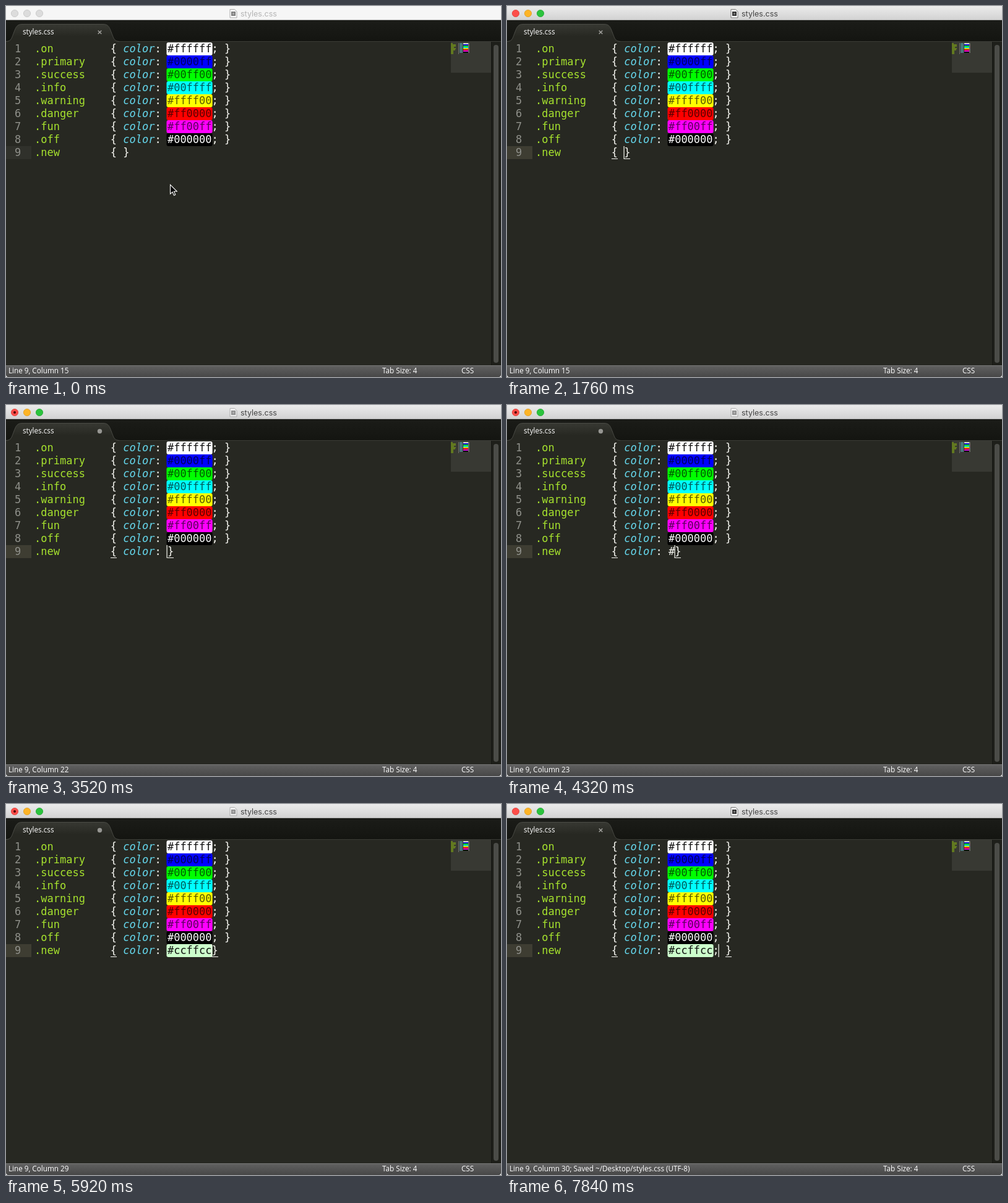
These frames come from a looping animation (800x601 px, 8000 ms). An HTML page:

```html
<!DOCTYPE html>
<html lang="en">
<head>
<meta charset="utf-8">
<title>styles.css</title>
<style>
  html, body { margin: 0; width: 100%; height: 100%; overflow: hidden; background: #272822; }
  svg { display: block; width: 800px; height: 601px; }
  text { white-space: pre; }
  .code text { font: 17px "DejaVu Sans Mono", monospace; fill: #f8f8f2; }
  .code .num { fill: #8f908a; }
  .code .sel { fill: #a6e22e; }
  .code .prop { fill: #66d9ef; font-style: italic; }
  .code .hex { fill: #ae81ff; }
  .code .dark { fill: #000; fill-opacity: .65; }
  .code .black { fill: #111; }
  .code .white { fill: #fff; }
  .ui { font: 11.7px "Open Sans", sans-serif; fill: #fff; }
  .title { font: 12.5px Inter, sans-serif; }
</style>
</head>
<body>
<svg viewBox="0 0 800 601">
  <defs>
    <linearGradient id="bar" x2="0" y2="1"><stop stop-color="#ebebeb"/><stop offset="1" stop-color="#d2d2d2"/></linearGradient>
    <linearGradient id="strip" x2="0" y2="1"><stop stop-color="#1b1c18"/><stop offset="1" stop-color="#141511"/></linearGradient>
    <linearGradient id="tab" x2="0" y2="1"><stop stop-color="#373832"/><stop offset=".7" stop-color="#272822"/></linearGradient>
    <linearGradient id="status" x2="0" y2="1"><stop stop-color="#626262"/><stop offset="1" stop-color="#474747"/></linearGradient>
  </defs>
  <rect width="800" height="601" fill="#272822"/>

  <rect y="23" width="800" height="34" fill="url(#strip)"/>
  <path d="M0 57.5H800" stroke="#3b3c36"/>
  <path d="M0 58C9 57 9 52 13 42C16 34 18 29.500 26 29.500H157C165 29.500 167 34 170 42C174 52 174 57 183 58Z" fill="url(#tab)"/>
  <path d="M0 57.500C9 57 9 52 13 42C16 34 18 29.500 26 29.500H157C165 29.500 167 34 170 42C174 52 174 57 183 57.500" fill="none" stroke="#4a4b45"/>
  <text class="ui" x="27" y="46">styles.css</text>
  <path id="close" d="M148.700 39.700l5.600 5.600m0-5.600l-5.600 5.600" stroke="#a5a5a1" stroke-width="1.400"/>
  <circle id="dirty" cx="151.500" cy="42.500" r="3.700" fill="#969692"/>

  <rect id="titlebar" width="800" height="23"/>
  <path d="M0 22.500H800" stroke="#b3b3b3"/>
  <g id="lights" stroke-width=".8"></g>
  <circle id="unsaved" cx="14" cy="12" r="2" fill="#4d0000"/>
  <g id="icon">
    <path d="M362 5.500h7.500l3.500 3.500v10h-11z" fill="#fff" stroke="#777"/>
    <rect x="364" y="9" width="7" height="7" fill="#333"/>
    <rect x="366" y="11" width="3" height="3" fill="#777"/>
  </g>
  <text id="title" class="title" x="379" y="17">styles.css</text>

  <rect x="719" y="58" width="65" height="50" fill="#383933"/>
  <g id="map"></g>
  <rect x="784" y="58" width="16" height="524" fill="#1e1f1a"/>
  <path d="M784.500 58V582" stroke="#151612"/>
  <rect x="788" y="63" width="8" height="515" rx="4" fill="#4b4c48"/>

  <rect id="gutter" y="227" width="41" height="21"/>
  <g id="rows" class="code"></g>
  <g id="live" class="code"></g>

  <rect y="582" width="800" height="19" fill="url(#status)"/>
  <path d="M0 582.500H800" stroke="#767676"/>
  <path d="M0 597v4h3q-3-1-3-4M800 597v4h-3q3-1 3-4" fill="#fff"/>
  <text id="info" class="ui" x="4" y="595"></text>
  <text class="ui" x="608" y="595">Tab Size: 4</text>
  <text class="ui" x="736" y="595">CSS</text>

  <path id="mouse" d="M0 0V15l3.500-3.300L6 17.300l2.300-1L5.900 10.800h4.800z" fill="#000" stroke="#fff" stroke-width="1.100"/>
</svg>
<script>
const LOOP = 8000, STEP = 160, FOCUS = 800, SAVE = 7360, BLINK = 480;
const $ = id => document.getElementById(id);
const col = n => 46 + n * 10.234;
const top9 = 227;

const rules = [
  ['on', 'ffffff', 'black'], ['primary', '0000ff', 'dark'], ['success', '00ff00', 'dark'],
  ['info', '00ffff', 'dark'], ['warning', 'ffff00', 'dark'], ['danger', 'ff0000', 'dark'],
  ['fun', 'ff00ff', 'dark'], ['off', '000000', 'white']
];

// time, typed text, swatch colour
const keys = [
  [0, ''], [1920, 'c'], [2080, 'co'], [2240, 'col'], [2560, 'colo'], [2720, 'color'],
  [3040, 'color:'], [3360, 'color: '], [4320, 'color: #'], [4480, 'color: #c'],
  [4640, 'color: #cc'], [4800, 'color: #ccf', '#ccccff'], [5120, 'color: #ccff', '#ccccff'],
  [5600, 'color: #ccffc'], [5760, 'color: #ccffcc', '#ccffcc'], [6400, 'color: #ccffcc;'],
  [6560, 'color: #ccffcc; '], [SAVE, 'color: #ccffcc; ', '#ccffcc'],
  [7680, 'color: #ccffcc; ', '#ccffcc', 1]
];

const put = (c, row, s, cls = '') =>
  `<text class="${cls}" x="${col(c)}" y="${75 + row * 21}">${s}</text>`;
const swatch = (row, len, fill) =>
  `<rect x="259.5" y="${59 + row * 21}" width="${len * 10.234 + 2.5}" height="21" rx="3" fill="${fill}"/>`;
const head = (row, name) =>
  `<text class="num" x="14" y="${75 + row * 21}">${row + 1}</text>` + put(0, row, '.' + name, 'sel') + put(12, row, '{');

$('rows').innerHTML = rules.map(([name, hex, cls], i) =>
  head(i, name) + put(14, i, 'color', 'prop') + put(19, i, ':') + swatch(i, 7, '#' + hex) +
  put(21, i, '#' + hex, cls) + put(28, i, '; }')).join('') + head(8, 'new');

const bit = (x, y, w, fill, o = 1) =>
  `<rect x="${x}" y="${y}" width="${w}" height="2" fill="${fill}" opacity="${o}"/>`;
$('map').innerHTML = rules.map(([name, hex], i) => {
  const y = 60 + i * 2;
  return bit(719, y, name.length + 1, '#7fa314', .6) + bit(731, y, 1, '#aaa', .5) +
    bit(733, y, 5, '#5fb4c4', .5) + bit(739, y, 8, '#' + hex, .8) + bit(747, y, 2, '#aaa', .4);
}).join('') + bit(719, 76, 4, '#7fa314', .6) + bit(731, 76, 1, '#aaa', .5);

function paintLights(on) {
  const fills = on ? ['#fc4e49', '#fdb426', '#2bc33d'] : Array(3).fill('#dcdcdc');
  const rims = on ? ['#df3d38', '#dd9a1c', '#1fa52e'] : Array(3).fill('#c5c5c5');
  $('lights').innerHTML = fills.map((f, i) =>
    `<circle cx="${14 + i * 20}" cy="12" r="5.6" fill="${f}" stroke="${rims[i]}"/>`).join('');
}

function paintLine([time, typed, fill, back = 0], t, on) {
  const end = 14 + typed.length, caret = end - back;
  const prop = typed.startsWith('color');
  const [, hex = '', tail = ''] = typed.match(/(#\w*)(.*)/) || [];
  let out = put(14, 8, typed.slice(0, 5), prop ? 'prop' : '');
  if (typed.length > 5) out += put(19, 8, ':');
  if (fill) out += swatch(8, hex.length, fill);
  const known = hex.length === 4 || hex.length === 7;
  out += put(21, 8, hex, fill ? 'black' : known ? 'hex' : '') + put(28, 8, tail);
  out += put(end + (typed ? 0 : 0), 8, '}');
  if (on) {
    for (const c of [12, end]) out += `<rect x="${Math.round(col(c))}" y="247" width="10" height="1" fill="#f8f8f2"/>`;
    const since = t - Math.max(time, FOCUS);
    if (Math.floor(since / BLINK) % 2 === 0)
      out += `<rect x="${Math.floor(col(caret)) - .5}" y="${top9}" width="1.2" height="21" fill="#f8f8f0"/>`;
  }
  $('live').innerHTML = out;
  $('info').textContent = `Line 9, Column ${caret + 1}` +
    (t >= SAVE ? '; Saved ~/Desktop/styles.css (UTF-8)' : '');
}

const show = (id, on) => $(id).style.display = on ? '' : 'none';

function paint(t) {
  const on = t >= FOCUS;
  const key = keys.filter(k => k[0] <= t).pop();
  const dirty = key[1] !== '' && t < SAVE;
  paintLights(on);
  paintLine(key, t, on);
  $('titlebar').setAttribute('fill', on ? 'url(#bar)' : '#f6f6f6');
  $('title').setAttribute('fill', on ? '#444' : '#b4b4b4');
  $('icon').setAttribute('opacity', on ? (dirty ? .45 : 1) : .6);
  $('gutter').setAttribute('fill', on ? '#3e3d32' : '#30312b');
  show('dirty', dirty);
  show('unsaved', dirty);
  show('close', !dirty);
  const p = Math.min(1, t / 1120), ease = p * p * (3 - 2 * p);
  $('mouse').setAttribute('transform', `translate(${265.5 + 40 * ease} ${289.5 + 315 * ease})`);
  show('mouse', p < 1);
}

let last = -1;
const start = performance.now();
function tick() {
  const t = Math.floor((performance.now() - start) % LOOP / STEP) * STEP;
  if (t !== last) paint(last = t);
  requestAnimationFrame(tick);
}
tick();
</script>
</body>
</html>
```
